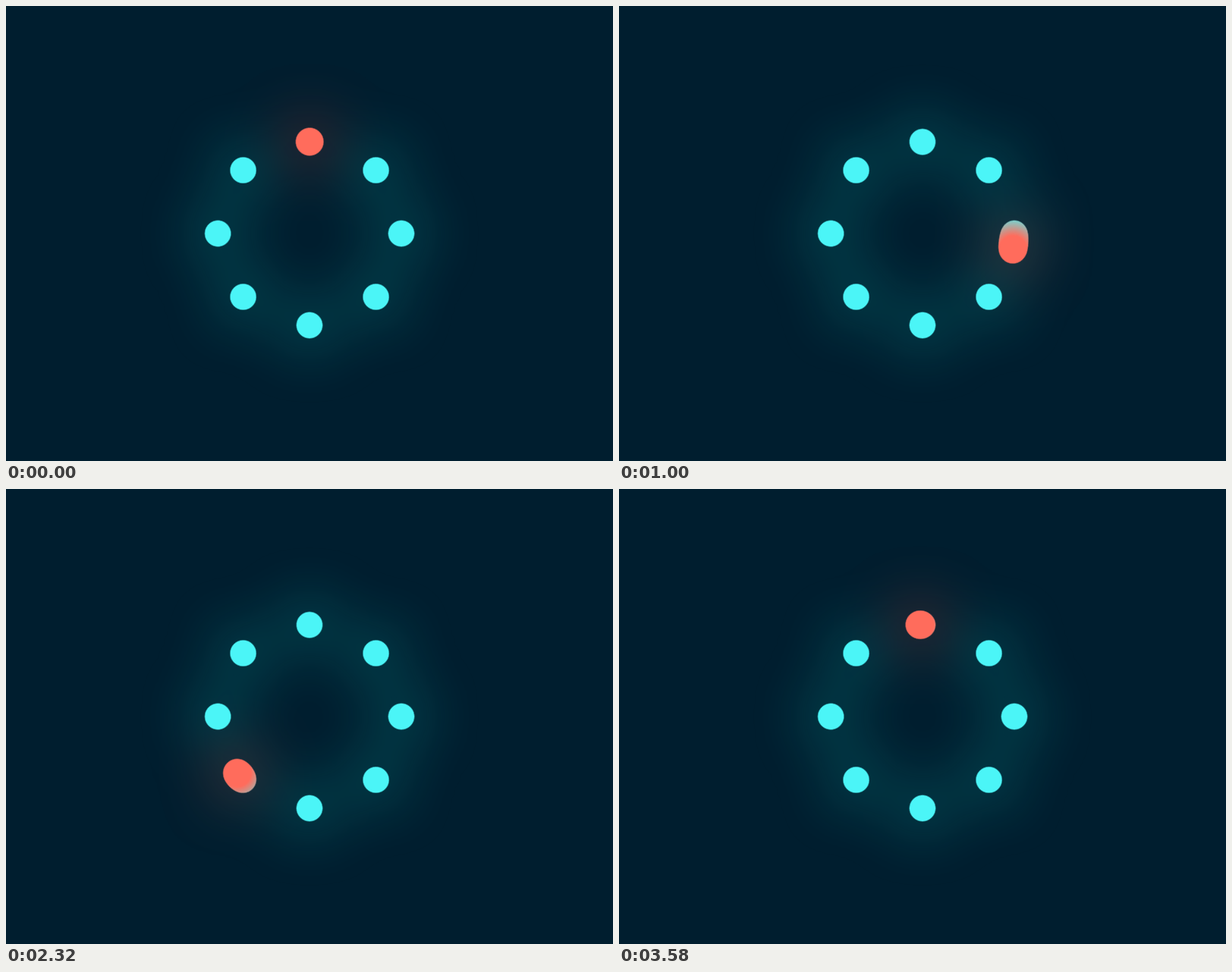
Write an HTML page that moves like this. It is 800 px wide and 600 px high and loops after 3600 ms.

```html
<!DOCTYPE html>
<html lang="en">
<head>
<meta charset="utf-8">
<title>Ring loader</title>
<style>
  html, body { margin: 0; width: 100%; height: 100%; overflow: hidden; background: #001e2f; }
  svg { display: block; width: 800px; height: 600px; }
  .dots { fill: none; stroke-linecap: round; }
  .orb { transform-origin: 400px 300px; animation: orbit 3600ms linear infinite; }
  @keyframes orbit { to { transform: rotate(360deg); } }
</style>
</head>
<body>
<svg viewBox="0 0 800 600">
  <defs>
    <path id="ring" class="dots" d="M400 179.2h.01M487.6 216.6h.01M521 300h.01M487.6 383.6h.01M400 421h.01M312.6 383.6h.01M279.2 300h.01M312.6 216.6h.01"/>

    <filter id="glow" filterUnits="userSpaceOnUse" x="0" y="0" width="800" height="600" color-interpolation-filters="sRGB">
      <feGaussianBlur stdDeviation="40"/>
    </filter>

    <filter id="goo" filterUnits="userSpaceOnUse" x="200" y="100" width="400" height="400" color-interpolation-filters="sRGB">
      <feGaussianBlur stdDeviation="10"/>
      <feColorMatrix values="1 0 0 0 0  0 1 0 0 0  0 0 1 0 0  0 0 0 18 -7"/>
    </filter>

    <radialGradient id="heat">
      <stop offset=".4" stop-color="#ff6c5c"/>
      <stop offset=".6" stop-color="#ff6c5c" stop-opacity=".68"/>
      <stop offset=".82" stop-color="#ff6c5c" stop-opacity=".3"/>
      <stop offset="1" stop-color="#ff6c5c" stop-opacity="0"/>
    </radialGradient>

    <!-- Merged silhouette of the dots and the orb -->
    <mask id="blobs" maskUnits="userSpaceOnUse" x="200" y="100" width="400" height="400">
      <g filter="url(#goo)">
        <use href="#ring" stroke="#fff" stroke-width="36"/>
        <circle class="orb" cx="400" cy="179" r="19" fill="#fff"/>
      </g>
    </mask>
  </defs>

  <rect width="800" height="600" fill="#001e2f"/>

  <g filter="url(#glow)">
    <use href="#ring" stroke="#0aebdc" stroke-width="34"/>
    <circle class="orb" cx="400" cy="179" r="18" fill="#f8402e"/>
  </g>

  <g mask="url(#blobs)">
    <rect x="200" y="100" width="400" height="400" fill="#4bf5f7"/>
    <circle class="orb" cx="400" cy="179" r="46" fill="url(#heat)"/>
  </g>
</svg>
</body>
</html>
```
